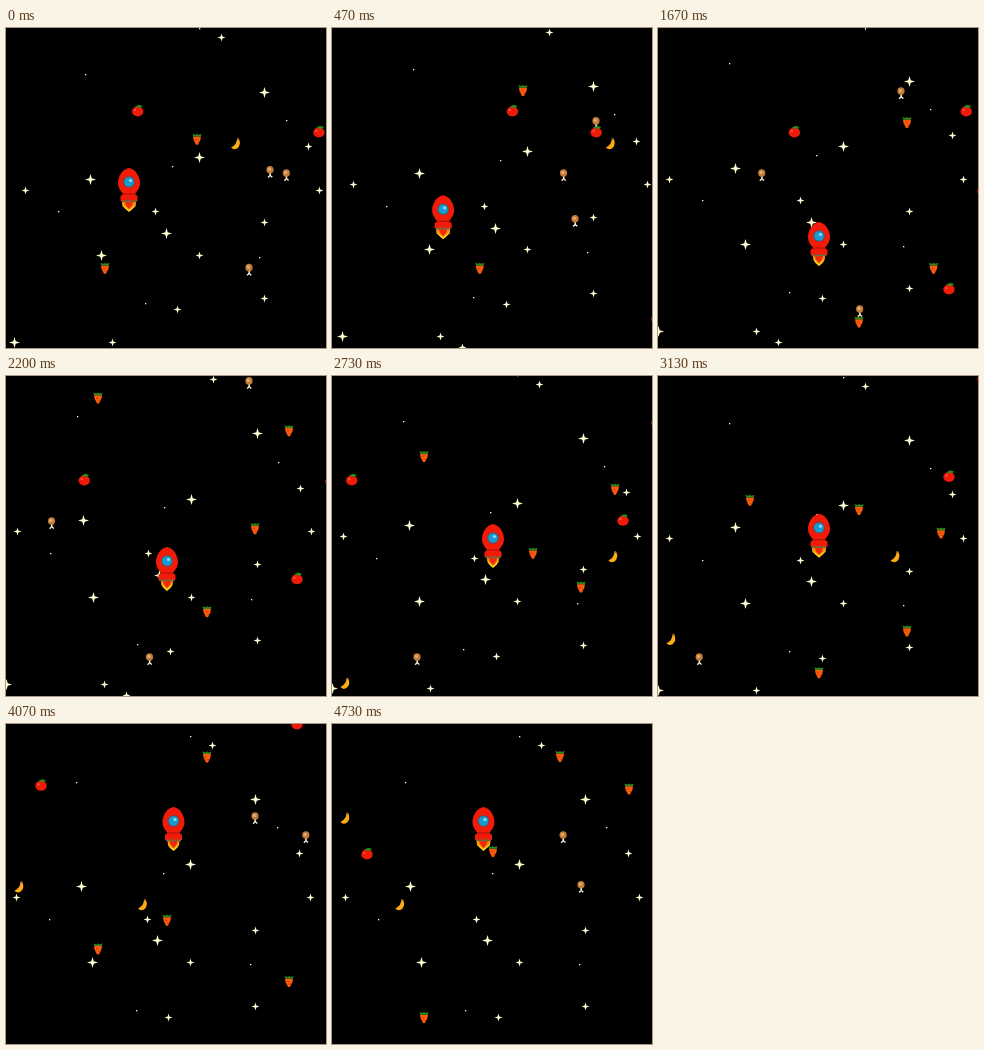
Write an HTML page with a canvas that moves like this. It is 320 px wide and 320 px high and loops after 4.79 s.

```html
<!DOCTYPE html>
<html lang="en">
<head>
<meta charset="utf-8">
<title>Rocket snacks</title>
<style>
html, body { margin: 0; width: 100%; height: 100%; overflow: hidden; background: #000; }
canvas { display: block; width: 320px; height: 320px; }
</style>
</head>
<body>
<canvas id="stage" width="320" height="320"></canvas>
<script>
const ctx = document.getElementById('stage').getContext('2d');
const LOOP = 4790;
const STEP = 200 / 3;
const PARALLAX = 0.2;

// rocket: time, x, y
const route = [
  [0, 123, 154], [930, 99.5, 208], [1670, 161, 208], [2730, 161, 162],
  [3530, 161, 141.5], [4070, 167.5, 97], [4730, 151.5, 97]
];

// stars sit on a grid of text cells: column, row
const CELL = 10.88;
const bigStars = [[23, 5], [17, 11], [7, 13], [14, 18], [8, 20], [0, 28]];
const smallStars = [[19, 0], [27, 10], [1, 14], [28, 14], [13, 16], [23, 17],
                    [17, 20], [23, 24], [15, 25], [9, 28], [11, 29]];
const dots = Array.from({ length: 7 }, (_, i) => [(17 + 18.5 * i) % 29, 4.2 * i - 0.8]);

// one snack enters per beat: kind, heading, lane
const BEAT = 32.65;
const LEAD = 242.6;
const snacks = [
  [banana, 'R', 116], [carrot, 'U', 191], [drumstick, 'U', 264], [tomato, 'R', 83],
  [carrot, 'R', 240], [drumstick, 'U', 243], [drumstick, 'L', 147], [tomato, 'L', 104],
  [tomato, 'U', 325], [drumstick, 'L', 283], [carrot, 'D', 249], [tomato, 'U', 291],
  [carrot, 'U', 201], [carrot, 'D', 283], [carrot, 'D', 92], [banana, 'L', 181],
  [banana, 'U', 13], [carrot, 'U', 161], [drumstick, 'D', 249], [tomato, 'D', 35],
  [drumstick, 'L', 113], [carrot, 'D', 297], [carrot, 'D', 228]
];
const place = {
  U: (lane, gone) => [lane, 321 - gone],
  D: (lane, gone) => [lane, 1.5 + gone],
  L: (lane, gone) => [327 - gone, lane],
  R: (lane, gone) => [gone - 13, lane]
};

function poly(color, ...points) {
  ctx.fillStyle = color;
  ctx.beginPath();
  for (let i = 0; i < points.length; i += 2) ctx.lineTo(points[i], points[i + 1]);
  ctx.fill();
}

function mirrored(color, ...half) {
  const other = [];
  for (let i = half.length - 2; i >= 0; i -= 2) other.push(-half[i], half[i + 1]);
  poly(color, ...half, ...other);
}

function oval(color, x, y, rx, ry = rx) {
  ctx.fillStyle = color;
  ctx.beginPath();
  ctx.ellipse(x, y, rx, ry, 0, 0, Math.PI * 2);
  ctx.fill();
}

function rect(color, x, y, w, h) {
  ctx.fillStyle = color;
  ctx.fillRect(x, y, w, h);
}

function at(x, y, draw, ...args) {
  ctx.save();
  ctx.translate(x, y);
  draw(...args);
  ctx.restore();
}

function star(r) {
  const points = [];
  for (let i = 0; i < 8; i++) {
    const reach = i % 2 ? r * 0.32 : r;
    points.push(reach * Math.cos(i * Math.PI / 4), reach * Math.sin(i * Math.PI / 4));
  }
  poly('#ffffd2', ...points);
}

function dot() {
  rect('#ffffd0', -0.5, -0.5, 1.3, 1.3);
}

function tomato() {
  oval('#f01a08', 0, 0.5, 5.7, 5);
  oval('#ff6a50', -2.5, -1, 1);
  poly('#2f8a1c', -3, -4, 1, -6.2, 5, -5, 3, -3);
}

function carrot() {
  mirrored('#ff5a0c', 4, -2.5, 3.4, 1, 1, 5.8);
  rect('#c93c06', -2, 0, 2, 1);
  rect('#c93c06', 0.5, 2.5, 1.5, 1);
  mirrored('#2f8a1c', 0, -5.5, 1, -4.2, 4.7, -5, 3.5, -2.5);
}

function banana() {
  ctx.fillStyle = '#ffac14';
  ctx.beginPath();
  ctx.moveTo(1.5, -5.5);
  ctx.quadraticCurveTo(1.5, 0.5, -4.5, 3.5);
  ctx.quadraticCurveTo(-2, 6.5, 1.5, 4.5);
  ctx.quadraticCurveTo(6, 1, 3.2, -5.5);
  ctx.fill();
  rect('#8a5010', 1.5, -6, 1.7, 1.7);
}

function drumstick() {
  poly('#fff4e0', -0.6, 1, 1, 1, 0.9, 3.5, 2.8, 5, 1.8, 6, 0.2, 4.6, -1.4, 6.2, -2.4, 5.2, -0.6, 3.5);
  oval('#c07c38', 0, -2, 3.6, 3.8);
  oval('#e4ac70', -0.6, -2.6, 1.6);
}

function rocket(narrow) {
  const w = narrow ? 6 : 7;
  mirrored('#ffd820', w, 19, w - 0.5, 24, 3.5, 27, 0, 30);
  mirrored('#ff8a00', w, 19, w - 1, 23, 2.5, 26, 0, 28);
  mirrored('#f02a08', 4.5, 19, 3, 23.5, 0, 27);

  ctx.fillStyle = '#f21a08';
  ctx.beginPath();
  ctx.moveTo(0, -14);
  ctx.bezierCurveTo(7, -13, 11, -5, 11, 1);
  ctx.bezierCurveTo(11, 6, 8, 9, 6, 12);
  ctx.lineTo(-6, 12);
  ctx.bezierCurveTo(-8, 9, -11, 6, -11, 1);
  ctx.bezierCurveTo(-11, -5, -7, -13, 0, -14);
  ctx.fill();
  mirrored('#f21a08', 6, 12, 8.5, 14, 8.5, 19);
  rect('#a81408', -6, 11.5, 12, 1);
  rect('#77663c', -7.5, 18.5, 15, 1.7);

  oval('#465a68', 0, 0, 5.8);
  oval('#179bd0', 0, 0, 4.8);
  oval('#8fe0f4', 1.5, -1.5, 1.6);
}

function rocketAt(t) {
  let i = 1;
  while (i < route.length - 1 && t > route[i][0]) i++;
  const [t0, x0, y0] = route[i - 1], [t1, x1, y1] = route[i];
  const p = Math.min(1, (t - t0) / (t1 - t0));
  return [x0 + (x1 - x0) * p, y0 + (y1 - y0) * p];
}

// steady speed, slightly slower around the seam of the loop
const flownAt = t => 0.107 * t - 2.6 * Math.sin(2 * Math.PI * t / LOOP);

function render(time) {
  const step = Math.floor((time + 4) / STEP);
  const t = Math.round(step * STEP / 10) * 10;
  const [x, y] = rocketAt(t);
  const dx = (route[0][1] - x) * PARALLAX;
  const dy = (route[0][2] - y) * PARALLAX;

  rect('#000', 0, 0, 320, 320);
  const scatter = (cells, draw, size) => {
    for (const [col, row] of cells)
      at(Math.round(8 + col * CELL + dx) + 0.5, Math.round(9.2 + row * CELL + dy) + 0.5, draw, size);
  };
  scatter(bigStars, star, 5.5);
  scatter(smallStars, star, 4);
  scatter(dots, dot);

  snacks.forEach(([draw, heading, lane], i) => {
    const gone = flownAt(t) + LEAD - BEAT * i;
    if (gone >= 0) at(...place[heading](lane, gone), draw);
  });
  at(x, y, rocket, step % 4 === 1);
}

const start = performance.now();
function tick() {
  render((performance.now() - start) % LOOP);
  requestAnimationFrame(tick);
}
tick();
</script>
</body>
</html>
```
